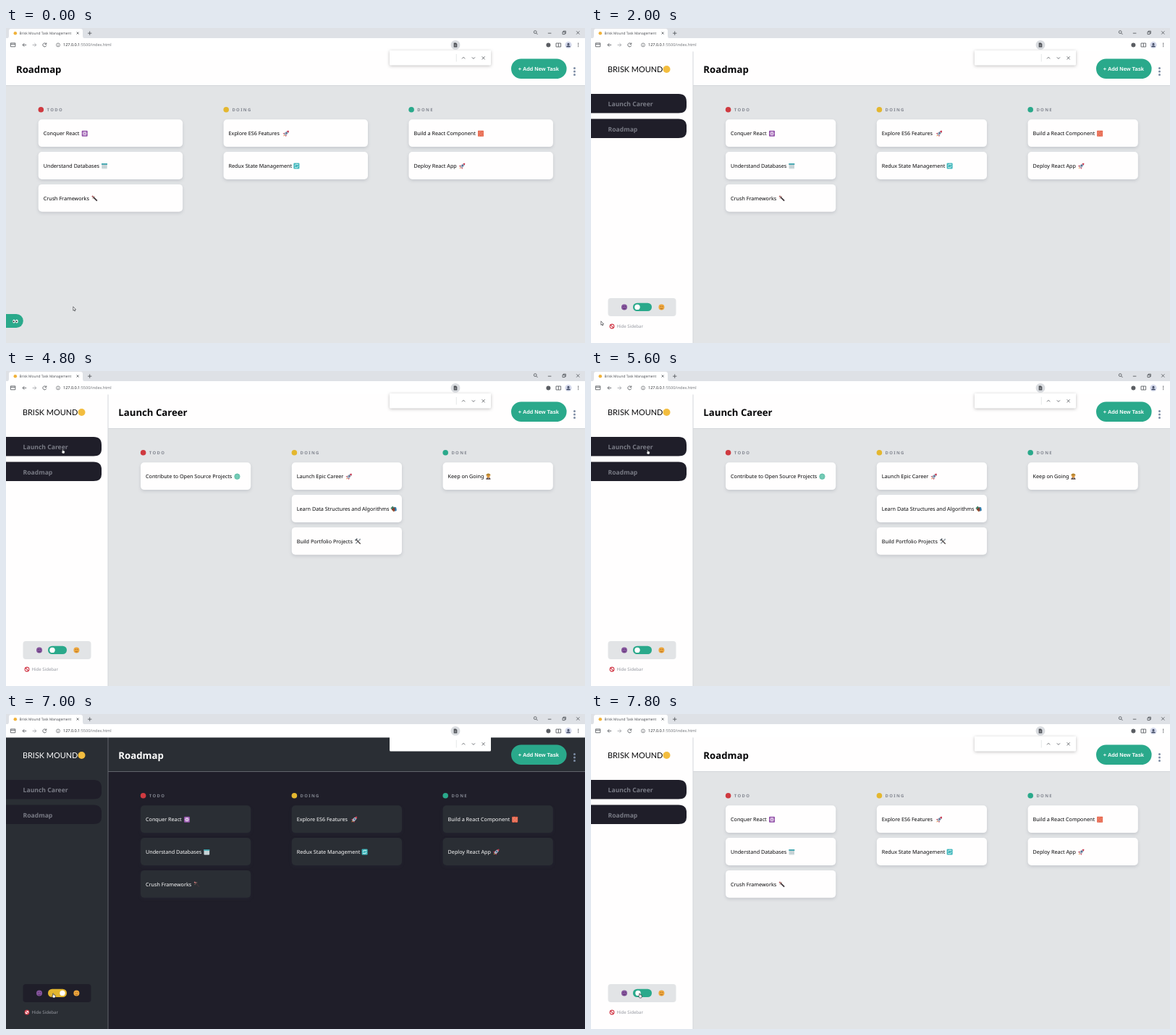
These frames come from a looping animation (800x435 px, 8 s). An HTML page:

```html
<!DOCTYPE html>
<html lang="en">
<head>
<meta charset="utf-8">
<title>Task board</title>
<style>
html, body { margin: 0; width: 100%; height: 100%; overflow: hidden; background: #fff; }
svg { display: block; width: 800px; height: 435px; text-rendering: geometricPrecision; }
svg {
  --page: #e2e4e6; --panel: #fffefe; --ink: #050507; --line: #d3d6da; --accent: #2aa98b;
  --shade: drop-shadow(0 2px 2px rgba(54, 62, 80, .16));
}
svg.dark {
  --page: #1f1e29; --panel: #2a2e34; --ink: #fff; --line: #62656c; --accent: #e4b72f;
  --shade: drop-shadow(0 2px 2px rgba(54, 62, 80, .12));
}
text { font-family: "Noto Sans", "Open Sans", sans-serif; }
.panel { fill: var(--panel); }
.page { fill: var(--page); }
.ink { fill: var(--ink); }
.line { stroke: var(--line); }
.card { fill: var(--panel); filter: var(--shade); }
.label { font-size: 7.2px; fill: var(--ink); }
.title { font-size: 13.2px; font-weight: 700; fill: var(--ink); }
.head { font-size: 5.9px; font-weight: 600; letter-spacing: 1.35px; fill: #828690; }
.item { font-size: 8.6px; font-weight: 600; fill: #797b85; }
.brand { font: 10.9px Lato, sans-serif; fill: var(--ink); }
.add { font: bold 7.4px "Liberation Sans", Arial, sans-serif; fill: #fff; }
.hide { font-size: 6.1px; fill: #9699a1; }
.tab { font: 4.9px "Open Sans", sans-serif; fill: #45484d; }
.url { font: 5.5px "Open Sans", sans-serif; fill: #6b6e73; }
.icon { fill: none; stroke: #4b4e53; stroke-width: .8; }
.pop { filter: drop-shadow(0 1.5px 2px rgba(0, 0, 0, .25)); }
.dark .pop { filter: none; }
</style>
</head>
<body>
<svg id="stage" viewBox="0 0 800 435" xmlns="http://www.w3.org/2000/svg">
  <defs>
    <g id="atom"><rect x="-4" y="-4" width="8" height="8" rx="1" fill="#9150a8"/>
      <g fill="none" stroke="#f3e6f7" stroke-width=".6"><ellipse rx="3" ry="1.2"/>
      <ellipse rx="3" ry="1.2" transform="rotate(60)"/><ellipse rx="3" ry="1.2" transform="rotate(120)"/></g></g>
    <g id="calendar"><rect x="-3.8" y="-3.6" width="7.6" height="7.6" rx=".8" fill="#cfdadd"/>
      <path d="M-4-2.6H4" stroke="#3aa3ad" stroke-width="1.8"/>
      <path d="M-3 0H3M-3 2H3" stroke="#a9b9be" stroke-width=".7" stroke-dasharray="1 .6"/></g>
    <g id="wand"><path d="M-3.2-3.2L3.4 3.4" stroke="#3c3338" stroke-width="1.7"/>
      <path d="M-3.5-3.5L-1.6-1.6" stroke="#c47878" stroke-width="1.8"/>
      <path d="M-.2-3.2v1.4M-3.2.2h1.2" stroke="#b08a72" stroke-width=".7"/></g>
    <g id="rocket" transform="rotate(45)"><path d="M-1.6 0L-3.1 3.2L-1 2.6ZM1.6 0L3.1 3.2L1 2.6Z" fill="#c92d48"/>
      <path d="M0-5.4C2-3.8 2.2 0 1.4 2.8H-1.4C-2.2 0-2-3.8 0-5.4Z" fill="#a9b5c4"/>
      <path d="M0-5.4C1-4.6 1.4-3.8 1.6-3H-1.6C-1.4-3.8-1-4.6 0-5.4Z" fill="#d2354d"/>
      <circle cy="-.8" r="1" fill="#3b5c86"/><path d="M-.9 3H.9L0 5.2Z" fill="#f08a3a"/></g>
    <g id="cycle"><rect x="-4" y="-4" width="8" height="8" rx="1" fill="#41b8bd"/>
      <path d="M-2.2-.4A2.2 2.2 0 0 1 1.8-1.4V-2.6M2.2.4A2.2 2.2 0 0 1-1.8 1.4V2.6" fill="none" stroke="#fff" stroke-width=".8"/></g>
    <g id="brick"><rect x="-4" y="-4" width="8" height="8" rx=".6" fill="#e4573d"/>
      <path d="M-4-2H4M-4 0H4M-4 2H4M-1-4v2M2-2v2M-2-2v2M0 0v2M-2 2v2M2 2v2" stroke="#f6b5a2" stroke-width=".5"/></g>
    <g id="globe"><circle r="3.9" fill="#8bdac6"/><g fill="none" stroke="#4fb09b" stroke-width=".5">
      <circle r="3.7"/><ellipse rx="1.7" ry="3.7"/><path d="M-3.7 0H3.7M-3-2H3M-3 2H3"/></g></g>
    <g id="books"><path d="M-4.2-1L-1.4-4L1-1.6L-1.6 1.6Z" fill="#3f7f63"/><path d="M-3 1L1-2.6L3.6 1L0 4Z" fill="#8a3e2b"/>
      <path d="M1-3L3.6-2L4.2 2L2 3.6Z" fill="#2f78a8"/><path d="M-2.4 1.8L0 3.4" stroke="#edd8b2" stroke-width=".8"/></g>
    <g id="tools"><path d="M-3 3L2.6-2.6" stroke="#8d969d" stroke-width="1.3"/><path d="M3.4 3.4L-2.2-2.2" stroke="#4a4240" stroke-width="1.3"/>
      <path d="M-3.8-1.2L-1-3.8" stroke="#59636a" stroke-width="1.6"/><circle cx="2.8" cy="-2.8" r="1.1" fill="#a3abb1"/></g>
    <g id="worker"><path d="M-3.2 4Q-3 1.2 0 1.2T3.2 4Z" fill="#5a4a4a"/><circle cy="-.6" r="2.3" fill="#e2983f"/>
      <path d="M-3.2-1.4Q-2.6-4.2 0-4.2T3.2-1.4Z" fill="#b5852f"/><path d="M-.6 1.6H.6L0 3.6Z" fill="#e8d9b5"/></g>
    <g id="arrow"><path d="M-1.2-3.2V2.2L0 1.2L.8 3L1.7 2.6L.9.9H2.6Z" fill="#fff" stroke="#26282c" stroke-width=".6"/></g>
    <g id="hand"><path d="M-1.4-3Q-.6-3.6-.2-2.8V-1.2L2.1-.7Q2.6 1.4 1.6 3H-1L-2.5.5L-1.4.3Z" fill="#fff" stroke="#1c1d22" stroke-width=".6"/></g>
  </defs>

  <rect class="page" width="800" height="435"/>
  <rect class="panel" y="32" width="800" height="47.5"/>
  <path class="line" d="M0 79.5H800"/>
  <g id="boards"></g>

  <g id="opener"><path d="M0 395H14.3A9.5 9.5 0 0 1 14.3 414H0Z" fill="#2aa98b"/>
    <g fill="#fff"><ellipse cx="11" cy="405" rx="1.8" ry="2.5"/><ellipse cx="14.9" cy="405" rx="1.8" ry="2.5"/></g>
    <g fill="#222"><circle cx="10.6" cy="405.3" r="1"/><circle cx="14.5" cy="405.3" r="1"/></g></g>

  <g id="sidebar">
    <rect class="panel" y="32" width="141" height="403"/>
    <path class="line" d="M141 32V435"/>
    <text class="brand" x="23" y="61">BRISK MOUND</text>
    <circle cx="104.5" cy="57" r="5" fill="#f3bd3f"/>
    <path d="M0 91H121Q132 91 132 102V108Q132 117.5 121 117.5H0ZM0 125.5H121Q132 125.5 132 136V143Q132 152 121 152H0Z" fill="#1f1e29"/>
    <text class="item" x="23.6" y="107.5">Launch Career</text>
    <text class="item" x="23.6" y="142.5">Roadmap</text>
    <rect class="page" x="23.5" y="373" width="94" height="25" rx="4"/>
    <circle cx="46" cy="385.6" r="4" fill="#85559c"/>
    <path d="M44 384.6h1.2M46.8 384.6H48M44.4 387.4q1.6 1 3.2 0" fill="none" stroke="#452257" stroke-width=".7"/>
    <circle cx="97.4" cy="385.6" r="4" fill="#eda63c"/>
    <path d="M95.6 384.6h1.2M98.2 384.6h1.2M95.8 387.2q1.6 1.4 3.2 0" fill="none" stroke="#8e5022" stroke-width=".7"/>
    <rect x="58" y="379.7" width="26" height="11.4" rx="5.7" style="fill:var(--accent)"/>
    <circle id="knob" cx="64" cy="385.4" r="3.7" fill="#fff"/>
    <circle cx="29" cy="412" r="2.9" fill="#fff" stroke="#d23c4b" stroke-width="1.1"/>
    <path d="M27 410L31 414" stroke="#d23c4b" stroke-width="1.1"/>
    <text class="hide" x="35.4" y="414.2">Hide Sidebar</text>
  </g>

  <rect x="698" y="42.4" width="76.6" height="27.6" rx="13.8" fill="#2aa98b"/>
  <text class="add" x="707.8" y="59">+ Add New Task</text>
  <g fill="#7d8ca4"><circle cx="785.5" cy="55.6" r="1.5"/><circle cx="785.5" cy="60" r="1.5"/><circle cx="785.5" cy="64.4" r="1.5"/></g>

  <rect width="800" height="15" fill="#dee1e6"/>
  <rect y="14" width="800" height="18.5" fill="#fff"/>
  <path d="M2 14.5Q4 14 4 11V4Q4 1 7 1H103Q106 1 106 4V11Q106 14 108 14.5Z" fill="#fff"/>
  <circle cx="12.8" cy="7.3" r="2.3" fill="#f0b23a"/>
  <text class="tab" x="18.5" y="9.2">Brisk Mound Task Management</text>
  <text class="url" x="79" y="25.2"><tspan fill="#24262a">127.0.0.1</tspan>:5500/index.html</text>
  <g class="icon">
    <path d="M97.6 5.6l3 3m0-3l-3 3M113 7.2h5.4M115.7 4.5v5.4"/>
    <circle cx="731.2" cy="5.6" r="1.9"/><path d="M732.6 7l2 2M748.8 7.2h4.6M788.2 4.4l4.2 4.2m0-4.2l-4.2 4.2"/>
    <path d="M769 5.4h3.2v3.2H769ZM770 5.2V4.2h3.4v3.4h-1"/>
    <path d="M6.4 20.8h6.4v5H6.4ZM6.4 22.4h6.4M28.2 23.4H23m2.4-2.4L23 23.4l2.4 2.4"/>
    <path d="M36.6 23.4h5.2m-2.4-2.4l2.4 2.4-2.4 2.4" stroke="#9b9da1"/>
    <path d="M55.4 22A2.5 2.5 0 1 0 55.7 24.2M55.8 20.4V22.4H53.6"/>
    <circle cx="72" cy="23.4" r="2.5" stroke-width=".6"/><path d="M72 23v1.8M72 21.7v.6" stroke-width=".6"/>
    <path d="M760 21h6.6v5H760ZM763.3 21v5"/>
  </g>
  <circle cx="621" cy="23.4" r="6.4" fill="#d9dce0"/>
  <path d="M618.7 20.4h3l1.6 1.6v4.6h-4.6Z" fill="#484b50"/><path d="M619.7 23h2.6M619.7 24.7h2.6" stroke="#d9dce0" stroke-width=".6"/>
  <circle cx="749.4" cy="23.4" r="3" fill="#5a5d62"/>
  <circle cx="777" cy="23.4" r="4.6" fill="#d3d8ea"/><circle cx="777" cy="22.2" r="1.5" fill="#3f4862"/><path d="M774.2 26.2q0-2 2.8-2t2.8 2Z" fill="#3f4862"/>
  <g fill="#4b4e53"><circle cx="790.7" cy="21.2" r=".7"/><circle cx="790.7" cy="23.4" r=".7"/><circle cx="790.7" cy="25.6" r=".7"/></g>
  <path class="pop" d="M530 31H670V50Q670 51.5 668.5 51.5H531.5Q530 51.5 530 50Z" fill="#fff"/>
  <path d="M622.3 36V46.5" stroke="#dcdee1" stroke-width=".7"/>
  <path class="icon" d="M630 42.4l2.1-2.1 2.1 2.1M643.8 40.4l2.1 2.1 2.1-2.1M657.6 39.4l4 4m0-4l-4 4"/>
  <use id="cursor"/>
</svg>
<script>
const LOOP = 8000;
const $ = id => document.getElementById(id);
const stage = $("stage");

// label, icon, icon offset from the card's left edge
const roadmap = [
  [["Conquer React", "atom", 64], ["Understand Databases", "calendar", 91.3], ["Crush Frameworks", "wand", 77.7]],
  [["Explore ES6 Features", "rocket", 86.3], ["Redux State Management", "cycle", 100.8]],
  [["Build a React Component", "brick", 99.5], ["Deploy React App", "rocket", 73.8]]
];
const career = [
  [["Contribute to Open Source Projects", "globe", 133.4]],
  [["Launch Epic Career", "rocket", 79], ["Learn Data Structures and Algorithms", "books", 140.8], ["Build Portfolio Projects", "tools", 91.5]],
  [["Keep on Going", "worker", 62.8]]
];
const heads = [["TODO", "#cf3a40"], ["DOING", "#e4b72f"], ["DONE", "#2aa98b"]];

const card = ([label, icon, dx], x, y, w) =>
  `<rect class="card" x="${x}" y="${y}" width="${w}" height="37.8" rx="5"/>
   <text class="label" x="${x + 7}" y="${y + 22}">${label}</text>
   <g transform="translate(${x + dx} ${y + 19.4})"><use href="#${icon}"/></g>`;

function board(id, title, cols, titleX, left, gap, width) {
  const body = cols.map((cards, i) => {
    const x = left + i * gap, [name, color] = heads[i];
    return `<circle cx="${x + 3.6}" cy="112.7" r="3.8" fill="${color}"/>
      <text class="head" x="${x + 11.8}" y="115">${name}</text>` +
      cards.map((c, row) => card(c, x, 126.3 + row * 44.8, width)).join("");
  }).join("");
  return `<g id="${id}"><text class="title" x="${titleX}" y="61.8">${title}</text>${body}</g>`;
}

$("boards").innerHTML =
  board("wide", "Roadmap", roadmap, 14, 44.7, 255.9, 199.4) +
  board("roadmap", "Roadmap", roadmap, 155.3, 186, 208.8, 152.2) +
  board("career", "Launch Career", career, 155.3, 186, 208.8, 152.2);

// time, x, y, pointer
const moves = [
  [0, 94, 388, "arrow"], [400, 84, 387], [600, 63, 387], [1000, 63, 423], [1400, 34, 411],
  [1800, 13, 406, "hand"], [2000, 15, 408, "arrow"], [2200, 16, 406], [2400, 18, 402], [2600, 22, 395], [2800, 27, 386],
  [3000, 37, 340], [3200, 50, 270], [3400, 63, 200], [3600, 77, 134, "hand"], [3800, 86, 103], [4000, 84, 105],
  [4400, 82, 108], [4600, 80, 110], [4800, 79, 111], [5000, 79, 112],
  [6000, 62, 140], [6600, 66, 382], [6800, 67, 389], [7000, 66, 389], [7600, 67, 389], [7800, 68, 389]
];
const views = [[0, "wide"], [1800, "roadmap"], [4400, "career"], [6000, "roadmap"]];
const themes = [[0, false], [7000, true], [7600, false]];
const knobs = [[0, 64], [6800, 69], [7000, 78], [7600, 70], [7800, 65]];

let pointer;
for (const m of moves) pointer = m[3] = m[3] || pointer;

const at = (table, t) => table.findLast(row => row[0] <= t);
const show = (id, on) => { $(id).style.display = on ? "" : "none"; };

function draw(t) {
  const view = at(views, t)[1];
  for (const id of ["wide", "roadmap", "career"]) show(id, id === view);
  show("opener", view === "wide");
  show("sidebar", view !== "wide");
  stage.classList.toggle("dark", at(themes, t)[1]);
  $("knob").setAttribute("cx", at(knobs, t)[1]);
  const [, x, y, kind] = at(moves, t);
  $("cursor").setAttribute("href", "#" + kind);
  $("cursor").setAttribute("transform", `translate(${x} ${y})`);
}

const start = performance.now();
function tick() {
  draw((performance.now() - start) % LOOP);
  requestAnimationFrame(tick);
}
tick();
</script>
</body>
</html>
```
